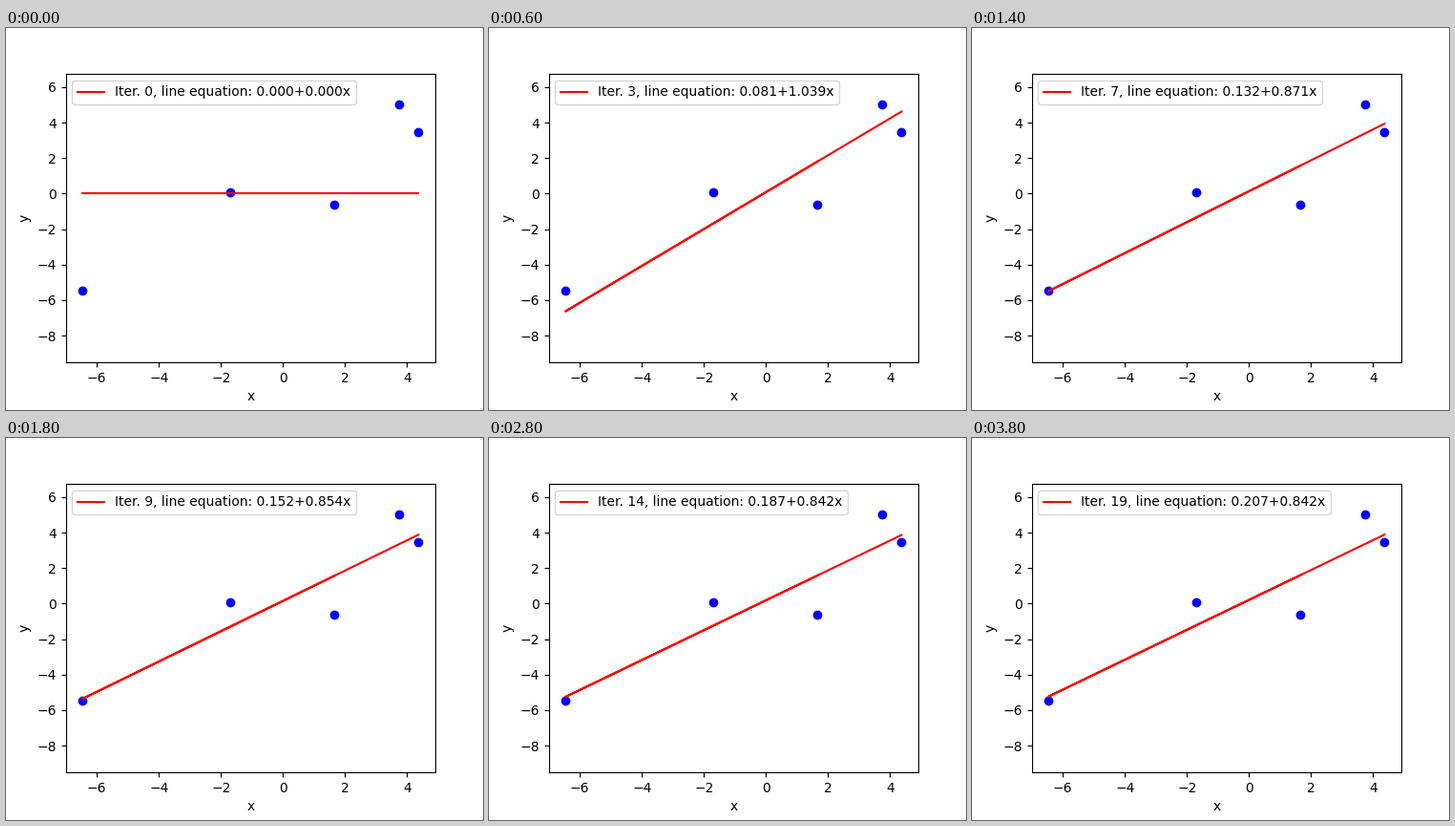
These frames come from a looping animation (500 by 400 pixels, 4000 ms). A matplotlib script:

```python
import matplotlib.pyplot as plt
import numpy as np
from matplotlib.animation import FuncAnimation

STEPS = 20
RATE = 0.1

x = np.array([1.661, -1.691, -6.464, 3.749, 4.370])
y = np.array([-0.602, 0.087, -5.451, 5.044, 3.476])


def descend(steps):
    """Return (intercept, slope) for every gradient descent step."""
    b = w = 0.0
    path = [(b, w)]
    for _ in range(steps - 1):
        error = y - (b + w * x)
        b, w = b + RATE * error.mean(), w + RATE * (error * x).mean()
        path.append((b, w))
    return path


path = descend(STEPS)

fig, ax = plt.subplots(figsize=(5, 4), dpi=100)
fig.subplots_adjust(left=0.125, right=0.9, bottom=0.125, top=0.88)
ax.set_xlabel("x")
ax.set_ylabel("y")
ax.plot(x, y, "bo")

# The first step overshoots the most, so it sets the axis limits.
b, w = path[1]
line, = ax.plot(x, b + w * x, "r", label="fit")
ax.autoscale_view()
ax.autoscale(False)
label = ax.legend(loc="upper left").get_texts()[0]


def update(i):
    b, w = path[i]
    line.set_ydata(b + w * x)
    label.set_text(f"Iter. {i}, line equation: {b:.3f}+{w:.3f}x")
    return line, label


anim = FuncAnimation(fig, update, frames=STEPS, interval=200,
                     repeat=True, repeat_delay=0)
plt.show()
```
